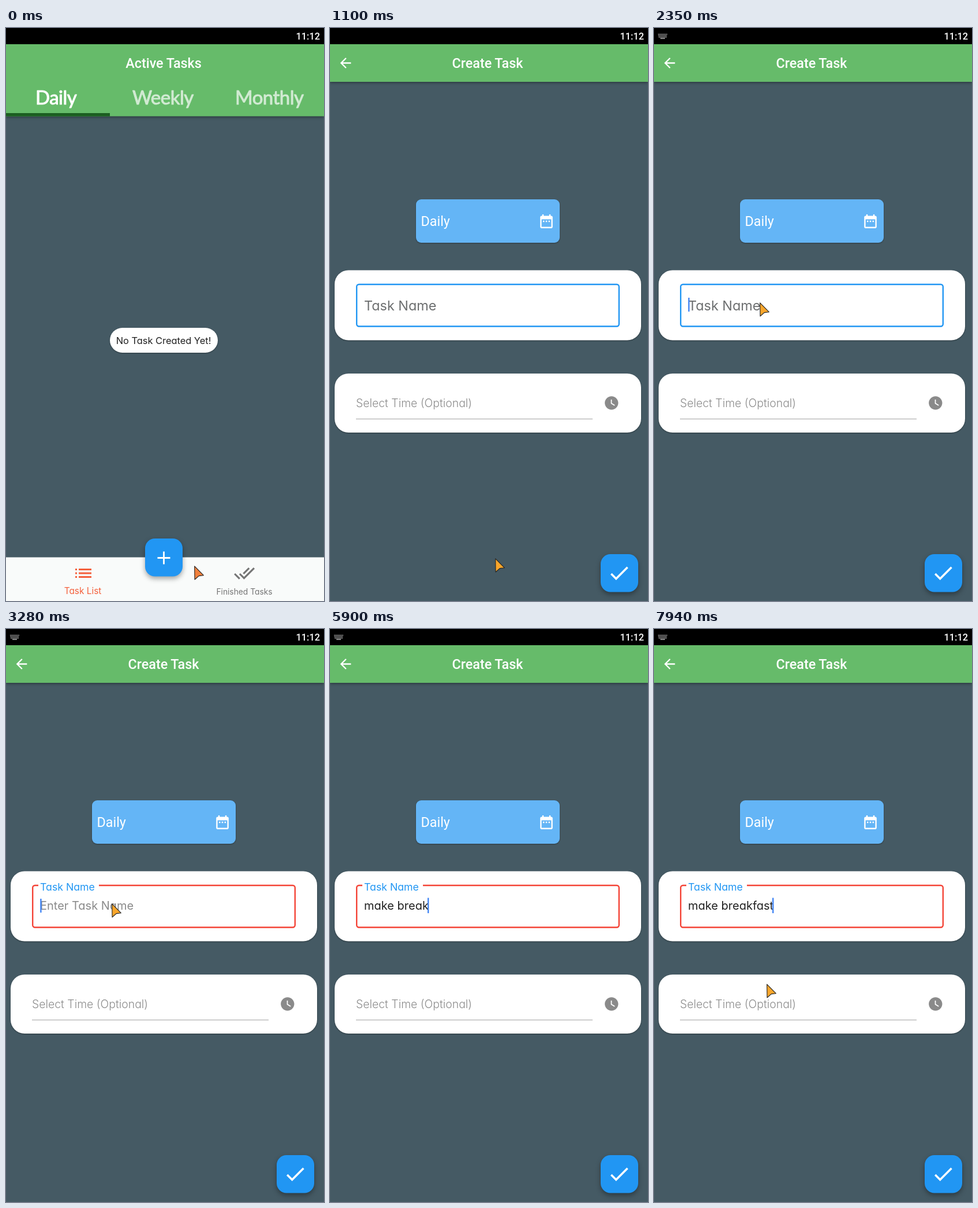
An HTML page for the animation above (8 s loop, 551 px wide and 990 px high).

```html
<!DOCTYPE html>
<html lang="en">
<head>
<meta charset="utf-8">
<title>Create a task</title>
<style>
  html, body { margin: 0; width: 100%; height: 100%; overflow: hidden; background: #455a64; }
  svg { display: block; width: 551px; height: 990px; }
  text { font-family: Inter, "Open Sans", sans-serif; font-feature-settings: "cv11"; white-space: pre; }
  .ui { font-family: Roboto, sans-serif; fill: #fff; }
  .title { font-size: 23.33px; font-weight: 500; text-anchor: middle; }
  .tab { font-family: Lato, sans-serif; font-size: 33px; letter-spacing: -.5px; fill: #fff;
         stroke: #fff; stroke-width: 1px; stroke-linejoin: round; }
  .idle { opacity: .7; }
  .bar { filter: drop-shadow(0 2px 2px rgba(0,0,0,.35)); }
  .card { filter: drop-shadow(0 1px 1px rgba(0,0,0,.35)); }
  .fab { fill: #2196f3; filter: drop-shadow(0 4px 4px rgba(0,0,0,.35)); }
  .on { fill: #f4603c; }
  .off { fill: #757575; }
</style>
</head>
<body>
<svg viewBox="0 0 551 990">
  <rect width="551" height="990" fill="#455a64"/>

  <g id="home">
    <rect class="bar" y="28" width="551" height="124.5" fill="#66bb6a"/>
    <rect y="147" width="180" height="5.5" fill="#1b5e20"/>
    <text class="ui title" x="273" y="69">Active Tasks</text>
    <text class="tab" x="51" y="132">Daily</text>
    <text class="tab idle" x="219" y="132">Weekly</text>
    <text class="tab idle" x="397" y="132">Monthly</text>

    <rect class="card" x="180" y="518" width="187" height="43" rx="21.5" fill="#fff"/>
    <text x="273" y="545.5" font-size="16.4" text-anchor="middle" fill="#212121">No Task Created Yet!</text>

    <rect y="914.5" width="551" height="75.5" fill="#f9fbfa"/>
    <path class="on" d="M120 934h3v3h-3zm0 6.5h3v3h-3zm0 6.5h3v3h-3zm6-13h22v3h-22zm0 6.5h22v3h-22zm0 6.5h22v3h-22z"/>
    <text class="on" x="133" y="978" font-size="15.4" text-anchor="middle">Task List</text>
    <path class="off" transform="translate(394.4 923.3) scale(1.55)" d="M18 7l-1.41-1.41-6.34 6.34 1.41 1.41L18 7zm4.24-1.41L11.66 16.17 7.48 12l-1.41 1.41L11.66 19l12-12-1.42-1.41zM.41 13.41L6 19l1.41-1.41L1.83 12 .41 13.41z"/>
    <text class="off" x="413" y="979" font-size="13.8" text-anchor="middle">Finished Tasks</text>
    <rect class="fab" x="241" y="882" width="65" height="65.5" rx="17"/>
    <path d="M262.5 915.5h22m-11-11v22" stroke="#fff" stroke-width="2.8"/>
  </g>

  <g id="form">
    <rect class="bar" y="28" width="551" height="65" fill="#66bb6a"/>
    <path fill="#fff" transform="translate(13 46.5) scale(1.167)" d="M20 11H7.83l5.59-5.59L12 4l-8 8 8 8 1.41-1.41L7.83 13H20v-2z"/>
    <text class="ui title" x="273" y="69">Create Task</text>

    <rect class="card" x="149" y="296" width="249" height="75" rx="9" fill="#64b5f6"/>
    <text class="ui" x="157.5" y="342" font-size="23.33">Daily</text>
    <path fill="#fff" transform="translate(360.6 319.6) scale(1.2)" d="M9 11H7v2h2v-2zm4 0h-2v2h2v-2zm4 0h-2v2h2v-2zm2-7h-1V2h-2v2H8V2H6v2H5c-1.11 0-1.99.9-1.99 2L3 20c0 1.1.89 2 2 2h14c1.1 0 2-.9 2-2V6c0-1.1-.9-2-2-2zm0 16H5V9h14v11z"/>

    <rect class="card" x="8" y="418.5" width="531" height="121" rx="24" fill="#fff"/>
    <rect id="outline" x="46.2" y="443" width="454.6" height="72.5" rx="4" fill="none" stroke-width="2.4"/>
    <rect id="gap" x="56" y="440" height="6" fill="#fff"/>
    <text id="label" font-size="23.4">Task Name</text>
    <text id="hint" x="59" y="485" font-size="20" fill="#8a8a8a">Enter Task Name</text>
    <text id="typed" x="59" y="485" font-size="20" fill="#212121"></text>
    <rect id="caret" width="2.4" fill="#4285f4"/>

    <rect class="card" x="8" y="597" width="531" height="102" rx="24" fill="#fff"/>
    <text x="45" y="655" font-size="19.4" font-weight="300" fill="#8c8c8c">Select Time (Optional)</text>
    <path d="M45 675.5h410" stroke="#bdbdbd" stroke-width="1.3"/>
    <path fill="#8a8a8a" transform="translate(473.8 633.8) scale(1.167)" d="M12 2C6.5 2 2 6.5 2 12s4.5 10 10 10 10-4.5 10-10S17.5 2 12 2zm4.2 14.2L11 13V7h1.5v5.2l4.5 2.7-.8 1.3z"/>
    <rect class="fab" x="469" y="909" width="65" height="65.5" rx="17"/>
    <path fill="#fff" transform="translate(480 920.7) scale(1.75)" d="M9 16.17L4.83 12l-1.42 1.41L9 19 21 7l-1.41-1.41z"/>
  </g>

  <rect width="551" height="28" fill="#000"/>
  <text class="ui" x="544" y="20" font-size="16.33" font-weight="500" text-anchor="end">11:12</text>
  <g id="keys" stroke="#aaa" stroke-width="1.6">
    <path d="M7 10.8h16M7.5 13.2h15M8 15.6h14" stroke-dasharray="1.5 .6"/>
    <path d="M11 18h8"/>
  </g>

  <g id="pointer">
    <path id="arrow" d="M.7 .8L16.3 16.7 8.2 17.6 1 24z" stroke="#222" stroke-width="1.1" stroke-linejoin="round"/>
    <circle id="ring" r="11" fill="none" stroke="#f9a62b" stroke-width="1.5" opacity=".7"/>
  </g>
</svg>
<script>
  const el = Object.fromEntries([...document.querySelectorAll('[id]')].map(e => [e.id, e]));
  const LOOP = 8000;
  const PHRASE = 'make breakfast';
  const KEY_TIMES = [3660, 3830, 3980, 4060, 4520, 4830, 5060, 5210, 5440, 5900, 6370, 6540, 6690, 6930];
  const CARET_X = [77, 91, 101, 112, 116.5, 129, 136, 147, 160, 169, 175, 188, 198, 205];

  // start, end, steps, from, to
  const MOVES = [
    [80, 470, 6, [326, 929], [286, 916]],
    [1250, 1950, 10, [286, 916], [183, 474]],
    [7710, 7940, 4, [185, 490], [195, 613]]
  ];

  const mix = (a, b, p) => a + (b - a) * p;
  const within = (t, a, b) => t >= a && t < b;
  const show = (e, on) => e.setAttribute('visibility', on ? 'inherit' : 'hidden');
  const set = (e, attrs) => { for (const k in attrs) e.setAttribute(k, attrs[k]); };
  const rgb = (a, b, p) => `rgb(${a.map((v, i) => Math.round(mix(v, b[i], p)))})`;
  const smooth = p => p * p * (3 - 2 * p);

  function stepped(t, start, end, steps) {
    if (t < start) return 0;
    if (t >= end) return 1;
    return (Math.floor((t - start) / (end - start) * (steps - 1)) + 1) / steps;
  }

  function drawPointer(t) {
    const [start, end, steps, from, to] = MOVES[t < 1250 ? 0 : t < 7710 ? 1 : 2];
    const p = smooth(stepped(t, start, end, steps));
    const [x, y] = from.map((v, i) => mix(v, to[i], p));
    el.pointer.setAttribute('transform', `translate(${x} ${y})`);
    show(el.pointer, t < 3510 || t >= 7710);
    show(el.ring, within(t, 470, 930) || within(t, 1950, 2120));
    el.arrow.setAttribute('fill', rgb([240, 128, 60], [249, 166, 43], stepped(t, 80, 470, 6)));
  }

  function drawField(t) {
    const lift = t < 2420 ? 0 : t < 2500 ? .5 : 1;
    const count = KEY_TIMES.filter(k => k <= t).length;
    set(el.label, {
      transform: `translate(59 ${mix(488, 452, lift)}) scale(${mix(1, .757, lift)})`,
      fill: rgb([109, 111, 112], [33, 150, 243], lift)
    });
    el.outline.setAttribute('stroke', rgb([33, 150, 243], [244, 67, 54], lift));
    el.gap.setAttribute('width', 105 * lift);
    show(el.hint, lift === 1 && !count);
    el.typed.textContent = PHRASE.slice(0, count);
    set(el.caret, count
      ? { x: CARET_X[count - 1], y: 464.5, height: 26.5 }
      : { x: 59.2, y: 466, height: 24 });
    show(el.caret, t >= 2350 && !within(t, 2810, 3280) && !within(t, 7480, 7940));
  }

  function draw(t) {
    show(el.home, t < 1100);
    show(el.form, t >= 1100);
    show(el.keys, t >= 2270);
    drawPointer(t);
    if (t >= 1100) drawField(t);
    else [el.hint, el.caret].forEach(e => show(e, false));
  }

  const begin = performance.now();
  function tick() {
    draw((performance.now() - begin) % LOOP);
    requestAnimationFrame(tick);
  }
  tick();
</script>
</body>
</html>
```
